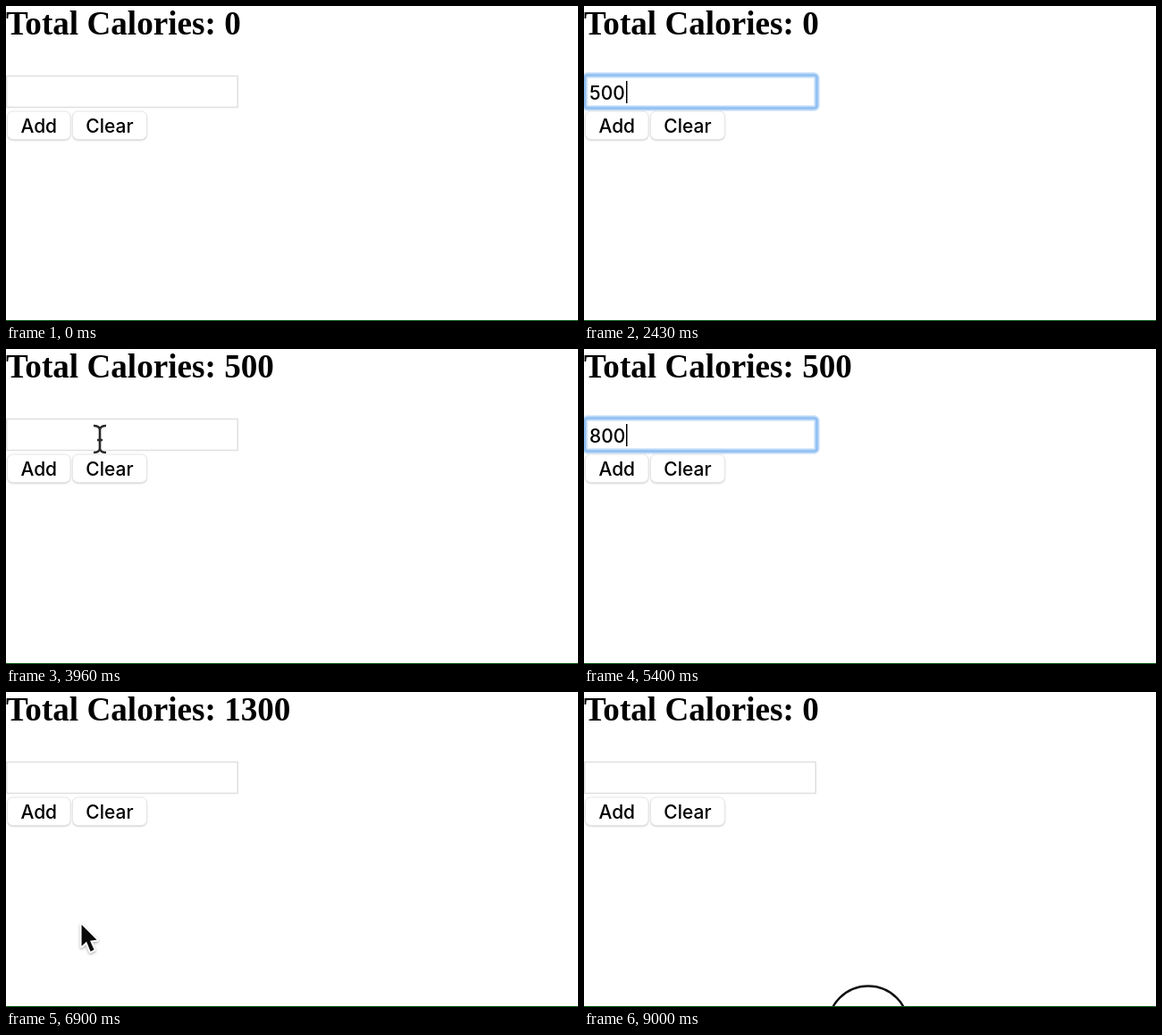
Write an HTML page with a canvas that moves like this. It is 640 by 353 pixels and loops after 9030 ms.

```html
<!DOCTYPE html>
<html lang="en">
<head>
<meta charset="utf-8">
<title>Calorie counter</title>
<style>
  html, body { margin: 0; width: 100%; height: 100%; overflow: hidden; background: #fff; }
  canvas { display: block; }
</style>
</head>
<body>
<canvas id="stage" width="640" height="353"></canvas>
<script>
const ctx = document.getElementById('stage').getContext('2d');
const LOOP = 9030, STEP = 30;
const UI_FONT = '500 21px Inter, Roboto, sans-serif';
const TITLE_FONT = 'bold 37.15px "Liberation Serif", "Noto Serif", serif';

const KEY_GAP = 390, PRESS_MS = 150, RING_MS = 180, CLEAR_AT = 8100;

// One round: click the field, type an amount, press Add.
const rounds = [
  { focus: 1230, type: 1650, press: 3480, amount: '500' },
  { focus: 4200, type: 4500, press: 6030, amount: '800' }
];

// Pointer glides; sag bends the path downwards.
const exit = { x: 292, y: 353 }, add = { x: 50, y: 137 }, field = { x: 105, y: 101 };
const glides = [
  { from: 30, ms: 870, to: { x: 137, y: 90 }, sag: -60 },
  { from: 2880, ms: 480, to: add, sag: 0 },
  { from: 3780, ms: 150, to: field, sag: 0 },
  { from: 5700, ms: 270, to: add, sag: 0 },
  { from: 6450, ms: 990, to: { x: 130, y: 152 }, sag: 120 },
  { from: 7470, ms: 390, to: { x: 113, y: 142 }, sag: 12 },
  { from: 8550, ms: 210, to: exit, sag: 0 }
];

const ease = p => p * p * (3 - 2 * p);
const pressed = (t, from) => t >= from && t < from + PRESS_MS;

function pointerAt(t) {
  const i = glides.findLastIndex(g => t >= g.from);
  if (i < 0) return exit;
  const { from, ms, to, sag } = glides[i];
  const start = i ? glides[i - 1].to : exit;
  const p = ease(Math.min(1, (t - from) / ms));
  return {
    x: start.x + (to.x - start.x) * p,
    y: start.y + (to.y - start.y) * p + sag * Math.sin(Math.PI * p)
  };
}

// Typing hides the pointer until it moves again.
function pointerHidden(t) {
  const typing = rounds.findLast(r => t >= r.type);
  const glide = glides.findLast(g => t >= g.from);
  return !glide || glide.to === exit && t >= glide.from + glide.ms
    || typing && glide.from < typing.type;
}

function totalAt(t) {
  if (t >= CLEAR_AT + PRESS_MS) return 0;
  return rounds.filter(r => t >= r.press + PRESS_MS)
    .reduce((sum, r) => sum + Number(r.amount), 0);
}

function text(str, x, y, font, color = '#000', align = 'left') {
  ctx.font = font;
  ctx.fillStyle = color;
  ctx.textAlign = align;
  ctx.fillText(str, x, y);
}

function stroke(width, color) {
  ctx.lineWidth = width;
  ctx.strokeStyle = color;
  ctx.stroke();
}

function box(x, y, w, h, r) {
  ctx.beginPath();
  ctx.roundRect(x, y, w, h, r);
}

function drawButton(label, x, w, down) {
  const y = 118, h = 31.5;
  const blue = ctx.createLinearGradient(0, y, 0, y + h);
  blue.addColorStop(0, '#6cb3fa');
  blue.addColorStop(1, '#0f6ff5');
  ctx.save();
  ctx.shadowColor = 'rgba(0,0,0,0.25)';
  ctx.shadowBlur = 2;
  ctx.shadowOffsetY = 1;
  box(x, y, w, h, 6);
  ctx.fillStyle = down ? blue : '#fff';
  ctx.fill();
  ctx.restore();
  stroke(1, down ? '#3d86ea' : '#e6e6e6');
  text(label, x + w / 2, 142, UI_FONT, down ? '#fff' : '#000', 'center');
}

function drawRing(p) {
  const grow = (1 - p) * 9;
  ctx.save();
  ctx.globalAlpha = p;
  box(1 - grow, 77.5 - grow, 259.5 + grow * 2, 37 + grow * 2, 3);
  stroke(7, '#dcebfc');
  stroke(4.5, '#b0d3f8');
  stroke(2, '#8fbdf0');
  ctx.restore();
}

function drawField(t) {
  box(0.75, 78.5, 258.5, 35, 0);
  stroke(1.5, '#e0e0e0');

  const round = rounds.find(r => t >= r.focus && t < r.press + PRESS_MS);
  if (!round) return;
  const focused = t < round.press;
  if (focused) drawRing(Math.min(1, (t - round.focus + STEP) / RING_MS));

  const typed = Math.max(0, Math.floor((t - round.type) / KEY_GAP) + 1);
  const value = round.amount.slice(0, typed);
  text(value, 6, 105, UI_FONT);
  const caretOn = t < round.type + 2.7 * KEY_GAP || t >= round.press - 600;
  if (focused && caretOn) {
    ctx.fillRect(Math.round(7 + ctx.measureText(value).width), 84, 1.5, 25);
  }
}

function drawArrow() {
  const outline = new Path2D('M0 0V24L5.5 19L10 30L14 28L9.5 18L17 17Z');
  ctx.lineJoin = 'round';
  ctx.shadowColor = 'rgba(0,0,0,0.3)';
  ctx.shadowBlur = 3;
  ctx.shadowOffsetY = 1.5;
  ctx.lineWidth = 4;
  ctx.strokeStyle = '#fff';
  ctx.stroke(outline);
  ctx.shadowColor = 'transparent';
  ctx.fillStyle = '#0a0a0a';
  ctx.fill(outline);
}

function drawBeam() {
  ctx.beginPath();
  for (const s of [-1, 1]) {
    ctx.moveTo(-7, 15 * s);
    ctx.quadraticCurveTo(-1, 15 * s, 0, 11 * s);
    ctx.quadraticCurveTo(1, 15 * s, 7, 15 * s);
  }
  ctx.moveTo(0, -12);
  ctx.lineTo(0, 12);
  ctx.moveTo(-3, 1);
  ctx.lineTo(3, 1);
  stroke(5, '#fff');
  stroke(2.6, '#2b2b2b');
}

function drawPointer(t) {
  if (pointerHidden(t)) return;
  const { x, y } = pointerAt(t);
  const overField = x < 260 && y > 78 && y < 114;
  ctx.save();
  ctx.translate(x, y);
  if (overField && t >= rounds[0].focus) drawBeam();
  else drawArrow();
  ctx.restore();
}

// A ring rises from the bottom edge as the loop ends.
function drawCircle(t) {
  const rise = Math.min(1, (t - LOOP + 90) / 60);
  if (rise <= 0) return;
  ctx.beginPath();
  ctx.arc(318, 398 - 23.5 * rise, 45, 0, Math.PI * 2);
  stroke(2.5, '#111');
}

function draw(t) {
  ctx.fillStyle = '#fff';
  ctx.fillRect(0, 0, 640, 353);
  text('Total Calories: ' + totalAt(t), 0, 32, TITLE_FONT);
  drawField(t);
  drawButton('Add', 1.5, 70.5, rounds.some(r => pressed(t, r.press)));
  drawButton('Clear', 74.5, 83, pressed(t, CLEAR_AT));
  drawCircle(t);
  drawPointer(t);
  ctx.fillStyle = '#0b5a14';
  ctx.fillRect(0, 352, 640, 1);
}

const start = performance.now();
function frame() {
  const t = (performance.now() - start) % LOOP;
  draw(Math.floor(t / STEP) * STEP);
  requestAnimationFrame(frame);
}
frame();
</script>
</body>
</html>
```
